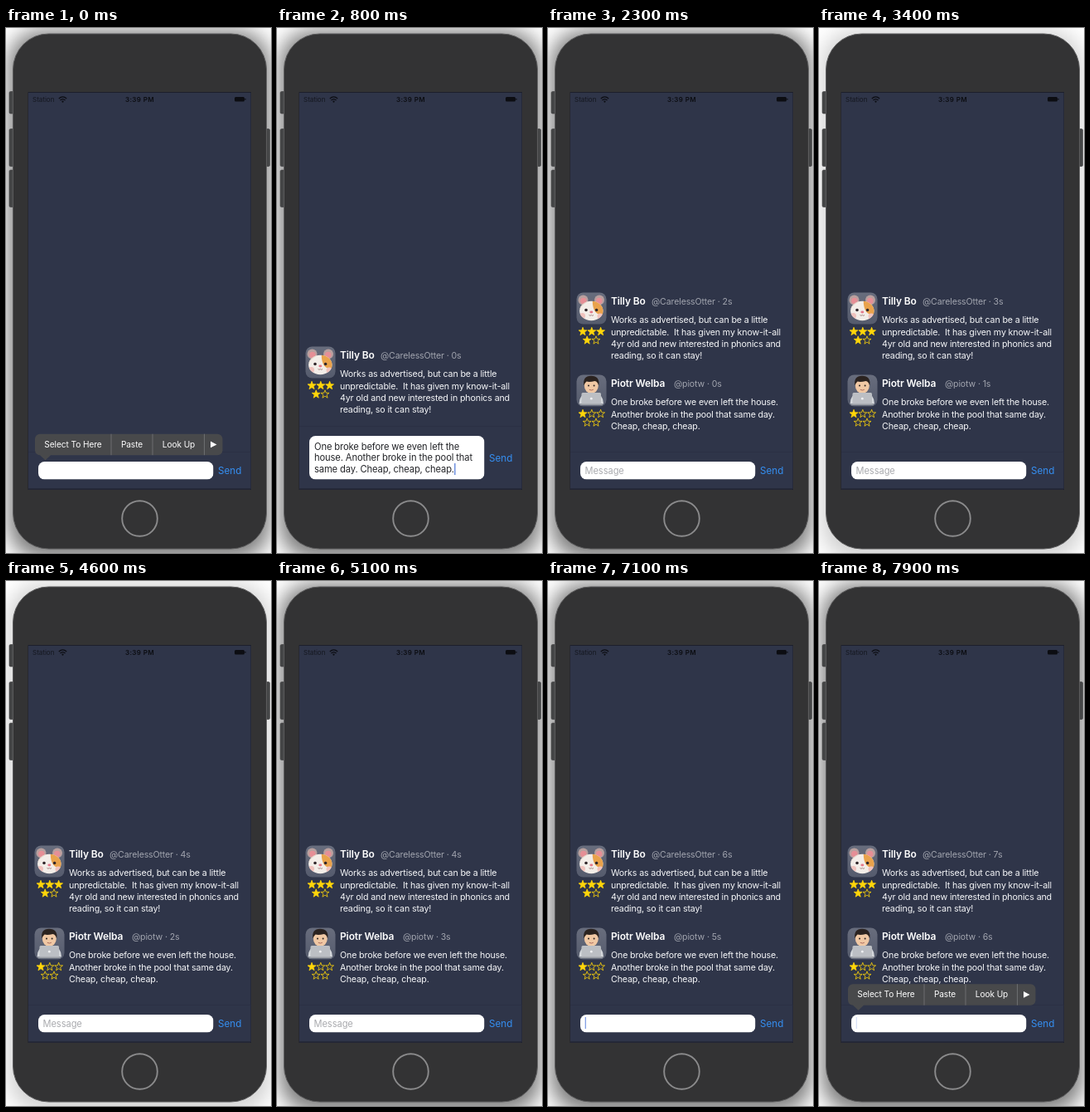
These frames come from a looping animation (320 px wide and 632 px high, 8000 ms). An HTML page:

```html
<!DOCTYPE html>
<html lang="en">
<head>
<meta charset="utf-8">
<title>Review chat</title>
<style>
  html, body { margin: 0; width: 100%; height: 100%; overflow: hidden; background: #fff; }
  svg { display: block; }
  text { font-family: Inter, Roboto, sans-serif; white-space: pre; }
  .name { font-size: 12px; font-weight: 600; letter-spacing: -.12px; fill: #fff; }
  .meta { font-size: 10.6px; letter-spacing: -.14px; fill: #a1a4ae; }
  .body { font-size: 10.7px; letter-spacing: -.16px; fill: #f6f7f9; }
  .draft { font-size: 11.2px; letter-spacing: -.13px; fill: #232428; }
  .hint { font-size: 11.1px; letter-spacing: -.06px; fill: #a9aaae; }
  .send { font-size: 11.7px; fill: #358ff2; }
  .item { font-size: 10.1px; letter-spacing: -.06px; fill: #fff; text-anchor: middle; }
  .status { font-size: 8px; fill: #0c0d12; }
</style>
</head>
<body>
<svg id="stage" width="100%" height="100%" viewBox="0 0 320 632">
  <defs>
    <filter id="blur" x="-20%" y="-20%" width="140%" height="140%"><feGaussianBlur stdDeviation="12"/></filter>
    <clipPath id="screen"><rect x="27" y="77.5" width="268.5" height="478"/></clipPath>
    <clipPath id="face"><ellipse cx="52.3" cy="12" rx="14.2" ry="11.8"/></clipPath>
    <linearGradient id="tile" x2="0" y2="1">
      <stop stop-color="#686d7d"/><stop offset="1" stop-color="#555b6d"/>
    </linearGradient>
  </defs>

  <rect width="320" height="632" fill="#fff"/>
  <rect id="shadow" x="3" y="3" width="316" height="636" rx="40" filter="url(#blur)"/>

  <g fill="#454647" stroke="#3a3a3b" stroke-width=".6">
    <rect x="4" y="76.5" width="8" height="26.5" rx="1.5"/>
    <rect x="4" y="121.5" width="8" height="45" rx="1.5"/>
    <rect x="4" y="171" width="8" height="44.5" rx="1.5"/>
    <rect x="310.5" y="121.5" width="8" height="45" rx="1.5"/>
  </g>
  <rect x="8.5" y="7" width="306" height="620" rx="43" fill="#333334" stroke="#5b5b5c"/>
  <circle cx="161.5" cy="590.5" r="21.3" fill="none" stroke="#8b8b8c" stroke-width="1.9"/>

  <rect x="26.5" y="77" width="269.5" height="479" fill="#1c1f2b"/>
  <rect x="27" y="78" width="268.5" height="477" fill="#2f3549"/>

  <g clip-path="url(#screen)">
    <g id="list"></g>
    <g id="bar">
      <rect x="27" width="268.5" height="90" fill="#2f3549"/>
      <rect x="27" width="268.5" height="1" fill="#2b3044"/>
    </g>
    <rect x="27" y="554.5" width="268.5" height="1" fill="#1c1f2b"/>
    <svg id="field" x="39" width="211.5">
      <rect id="paper" width="211.5" rx="7.5" fill="#fff"/>
      <text id="hint" class="hint" x="5.5" y="15">Message</text>
      <g id="draft"></g>
      <rect id="caret" width="1.2" height="14" fill="#4b74d8"/>
    </svg>
    <text id="send" class="send" x="256">Send</text>
  </g>

  <g>
    <text class="status" x="32" y="88.7" fill-opacity=".75">Station</text>
    <g fill="none" stroke="#0c0d12" stroke-width="1.3">
      <path d="M63.8 85q4.7 -4.2 9.4 0M65.5 87q3 -2.7 6 0"/>
      <circle cx="68.5" cy="88.6" r=".5"/>
    </g>
    <text class="status" x="161.5" y="88.7" text-anchor="middle" font-weight="600" letter-spacing=".4">3:39 PM</text>
    <rect x="276" y="83" width="12" height="5.5" rx="1.5" fill="#0c0d12"/>
    <rect x="288.5" y="84.7" width="1" height="2" rx=".5" fill="#0c0d12"/>
  </g>

  <g id="menu">
    <path d="M41 0H255.5a6 6 0 0 1 6 6V19.5a6 6 0 0 1 -6 6H54L47.5 31.5L41 25.5a6 6 0 0 1 -6 -6V6a6 6 0 0 1 6 -6Z" fill="#48494b"/>
    <path d="M127 0V25.5M177 0V25.5M239.5 0V25.5" stroke="#77787a" stroke-width=".8"/>
    <text class="item" x="81" y="16.3">Select To Here</text>
    <text class="item" x="152" y="16.3">Paste</text>
    <text class="item" x="208.5" y="16.3">Look Up</text>
    <path d="M247 8.8L254.5 12.7L247 16.6Z" fill="#fff"/>
  </g>
</svg>

<script>
const LOOP = 8000;
const T = { dismiss: 100, first: 200, paste: 300, send: 1600, second: 1700,
            blur: 2750, focus: 4800, tap: 5500, menu: 7200 };

const $ = id => document.getElementById(id);
const clamp = x => Math.min(1, Math.max(0, x));
const ease = (t, start, length) => {
  const p = clamp((t - start) / length);
  return p * p * (3 - 2 * p);
};
const set = (el, attrs) => { for (const k in attrs) el.setAttribute(k, attrs[k]); };

const hamster = `
  <g fill="#b9a09f"><circle cx="42.5" cy="-1" r="6"/><circle cx="62" cy="-1" r="6"/></g>
  <g fill="#e58f96"><circle cx="42.8" cy="0" r="3.8"/><circle cx="61.7" cy="0" r="3.8"/></g>
  <g clip-path="url(#face)">
    <rect x="36" y="-2" width="34" height="28" fill="#f3ede8"/>
    <path d="M54 -2Q53 7 57 13Q61 18 68 16V-2Z" fill="#e9a24c"/>
    <path d="M37 12Q41 4 50 0H37Z" fill="#e3d3c6"/>
    <circle cx="41.5" cy="18" r="3.5" fill="#f0c2bd"/><circle cx="63" cy="18.5" r="3.5" fill="#f0c2bd"/>
  </g>
  <circle cx="46" cy="11" r="1.8" fill="#30262a"/><circle cx="58.6" cy="11" r="1.8" fill="#30262a"/>
  <ellipse cx="52.3" cy="13.5" rx="2" ry="1.4" fill="#e5798b"/>
  <path d="M49.5 17Q51 18.7 52.3 17Q53.6 18.7 55 17" fill="none" stroke="#8d6a68" stroke-width=".8"/>`;

const coder = `
  <path d="M37.5 25Q38 13 47 12H57.5Q66.5 13 67 25Z" fill="#d5d8dc"/>
  <ellipse cx="52.3" cy="3" rx="8.5" ry="9.5" fill="#f0c8a4"/>
  <path d="M43.4 3Q41.5 -8.5 52 -8.8Q63 -8.5 61.2 3Q60 -2 56.5 -2.5Q50 -1 46.5 -2Q44.2 0 43.4 3Z" fill="#2b2320"/>
  <circle cx="49" cy="3" r="1" fill="#2b2320"/><circle cx="55.6" cy="3" r="1" fill="#2b2320"/>
  <path d="M49.8 7.8Q52.3 9.3 54.8 7.8" fill="none" stroke="#a5645a" stroke-width=".9"/>
  <rect x="40.5" y="11.5" width="23.5" height="14.5" rx="1.5" fill="#bcbfc4"/>
  <rect x="38.5" y="25" width="27.5" height="1.8" rx=".9" fill="#999da4"/>
  <circle cx="52.3" cy="18.7" r="1.4" fill="#eff0f2"/>`;

function star(cx, cy, full) {
  const points = Array.from({ length: 10 }, (_, i) => {
    const r = (i % 2 ? 2.15 : 5.2), a = i * Math.PI / 5;
    return (cx + r * Math.sin(a)).toFixed(2) + ',' + (cy - r * Math.cos(a)).toFixed(2);
  });
  return `<polygon points="${points.join(' ')}" fill="${full ? '#ffd60a' : 'none'}"
    stroke="#ffd60a" stroke-width=".8" stroke-linejoin="round"/>`;
}

// Rows are drawn around y = 0, the middle of the name line.
function addRow({ name, handle, x, score, art, lines }) {
  const row = document.createElementNS('http://www.w3.org/2000/svg', 'g');
  const stars = [0, 1, 2, 3, 4].map(i => i < 3
    ? star(42 + 10.8 * i, 37, i < score)
    : star(47.2 + 10.8 * (i - 3), 47.5, i < score));
  const body = lines.map((s, i) => `<text class="body" x="76" y="${26.8 + 14.3 * i}">${s}</text>`);
  row.innerHTML = `<rect x="34.5" y="-10" width="36" height="38" rx="8" fill="url(#tile)"/>
    ${art}${stars.join('')}
    <text class="name" x="76" y="4.3">${name}</text>
    <text class="meta" x="${x}" y="4.3">${handle} · <tspan></tspan></text>${body.join('')}`;
  $('list').append(row);
  const age = row.querySelector('tspan');
  return (y, alpha, seconds) => {
    set(row, { transform: `translate(0 ${y})`, opacity: alpha });
    age.textContent = Math.max(0, Math.floor(seconds)) + 's';
  };
}

const rowA = addRow({
  name: 'Tilly Bo', handle: '@CarelessOtter', x: 125, score: 4, art: hamster,
  lines: ['Works as advertised, but can be a little',
          'unpredictable.  It has given my know-it-all',
          '4yr old and new interested in phonics and',
          'reading, so it can stay!']
});
const rowB = addRow({
  name: 'Piotr Welba', handle: '@piotw', x: 152, score: 1, art: coder,
  lines: ['One broke before we even left the house.',
          'Another broke in the pool that same day.',
          'Cheap, cheap, cheap.']
});

$('draft').innerHTML = ['One broke before we even left the',
  'house. Another broke in the pool that',
  'same day. Cheap, cheap, cheap.']
  .map((s, i) => `<text class="draft" x="6" y="${16.5 + 13.8 * i}">${s}</text>`).join('');

function blink(age) {
  const p = age % 1000;
  return p < 550 ? 1 : p < 900 ? clamp((750 - p) / 200) : (p - 900) / 100;
}

function draw(t) {
  const grow = ease(t, T.paste, 250) - ease(t, T.send, 250);
  const push = ease(t, T.second, 300);
  const typed = t >= T.paste && t < T.send;
  const idle = t >= T.send && t < T.tap;

  const active = 1 - ease(t, T.blur, 150) + ease(t, T.focus, 150);
  set($('shadow'), { opacity: .18 + .34 * active });

  const y = 424.5 - 31 * grow - 96 * push;
  rowA(y, ease(t, T.first, 250), (t - T.first) / 1000);
  rowB(y + 99, push, (t - T.second) / 1000);

  const top = 522 - 31 * grow, height = 543.5 - top;
  set($('bar'), { transform: `translate(0 ${top - 12})` });
  set($('field'), { y: top, height });
  set($('paper'), { height });
  set($('send'), { y: top + height / 2 + 4.4 });
  set($('hint'), { opacity: idle ? 1 : 0 });
  set($('draft'), { opacity: typed ? 1 : 0 });

  const since = t < T.paste ? t + LOOP - T.menu : typed ? t - T.paste : t - (t < T.menu ? T.tap : T.menu);
  const end = $('draft').lastChild.getComputedTextLength();
  set($('caret'), {
    x: typed ? 6.3 + end : 5.7,
    y: typed ? 33 : 3,
    opacity: idle ? 0 : blink(since)
  });

  const early = t < T.menu;
  set($('menu'), {
    transform: `translate(0 ${early ? 488.7 : 485.2})`,
    opacity: early ? 1 - ease(t, T.dismiss, 200) : ease(t, T.menu, 200)
  });
}

const begin = performance.now();
function frame() {
  draw((performance.now() - begin) % LOOP);
  requestAnimationFrame(frame);
}
frame();
</script>
</body>
</html>
```
